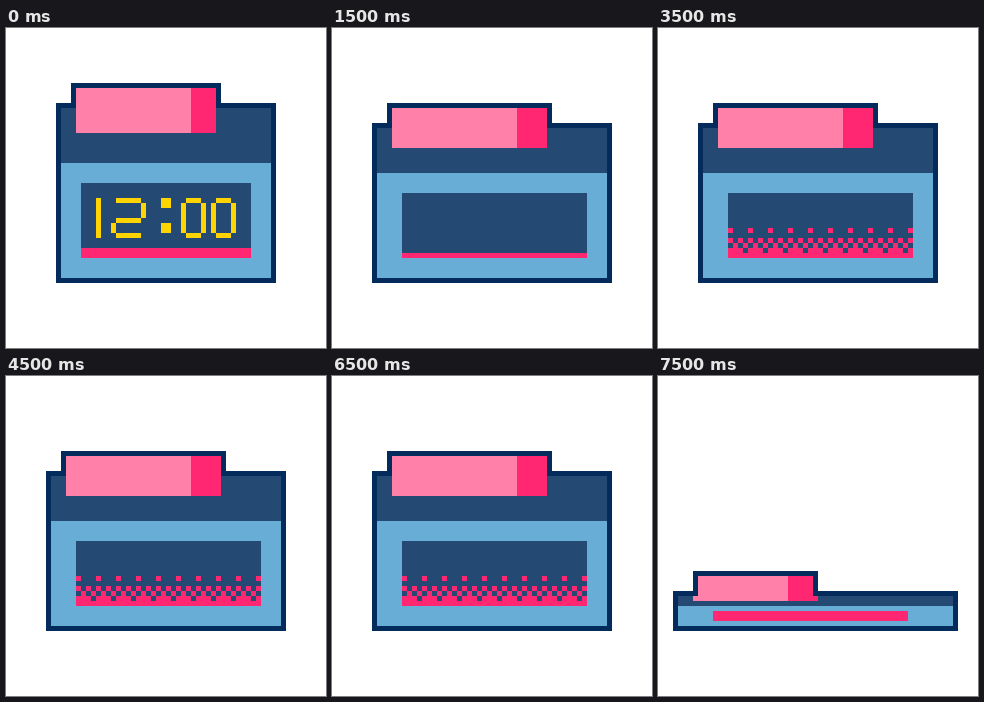
Animation of 320x320 px, one loop 8000 ms. Source, as an HTML page:

```html
<!DOCTYPE html>
<html lang="en">
<head>
<meta charset="utf-8">
<title>Bouncing alarm clock</title>
<style>
  html, body { margin: 0; width: 100%; height: 100%; overflow: hidden; background: #fff; }
  svg { display: block; width: 100%; height: 100%; }
</style>
</head>
<body>
<svg id="stage" viewBox="0 0 320 320" shape-rendering="crispEdges"></svg>
<script>
const LOOP = 8000, BEAT = 500, CELL = 5;
const INK = '#032b5b', NAVY = '#244a74', SKY = '#68add6';
const ROSE = '#ff80a8', PINK = '#ff2672', YELLOW = '#ffd400';
const stage = document.getElementById('stage');

// Boxes are given by their edges: left, top, right, bottom.
const box = (color, l, t, r, b) =>
  `<rect x="${l}" y="${t}" width="${r - l}" height="${b - t}" fill="${color}"/>`;

function clockBody({ body: [l, t, r], lid: [ll, lt, lr, lb], shade, split }) {
  return box(INK, l, t, r, 255) +
    box(INK, ll - 5, lt - 5, lr + 5, t + 5) +
    box(NAVY, l + 5, t + 5, r - 5, split) +
    box(SKY, l + 5, split, r - 5, 250) +
    box(ROSE, ll, lt, shade, lb) +
    box(PINK, shade, lt, lr, lb);
}

// Whether a cell is lit, for each row counted up from the screen's foot.
const ditherRows = [
  () => true,
  i => i % 4 !== 3,
  i => i % 2 === 1,
  i => i % 2 === 0,
  () => false,
  i => i % 4 === 0
];

function dither(left, right, foot) {
  let out = '';
  ditherRows.forEach((lit, row) => {
    const y = foot - (row + 1) * CELL;
    for (let i = 0; left + i * CELL < right; i++) {
      const x = left + i * CELL;
      if (lit(i)) out += box(PINK, x, y, x + CELL, y + CELL);
    }
  });
  return out;
}

const zero = x =>
  box(YELLOW, x + 5, 170, x + 20, 175) +
  box(YELLOW, x, 175, x + 5, 205) +
  box(YELLOW, x + 20, 175, x + 25, 205) +
  box(YELLOW, x + 5, 205, x + 20, 210);

const digits =
  box(YELLOW, 90, 170, 95, 210) +
  box(YELLOW, 110, 170, 135, 175) +
  box(YELLOW, 135, 175, 140, 190) +
  box(YELLOW, 110, 190, 135, 195) +
  box(YELLOW, 105, 195, 110, 205) +
  box(YELLOW, 110, 205, 135, 210) +
  box(YELLOW, 155, 170, 165, 180) +
  box(YELLOW, 155, 195, 165, 205) +
  zero(175) + zero(205);

function tall(glowing) {
  return clockBody({ body: [50, 75, 270], lid: [70, 60, 210, 105], shade: 185, split: 135 }) +
    box(NAVY, 75, 155, 245, 230) +
    (glowing ? dither(75, 245, 225) : '') +
    box(PINK, 75, 220, 245, 230) + digits;
}

function squat(glowing) {
  return clockBody({ body: [40, 95, 280], lid: [60, 80, 215, 120], shade: 185, split: 145 }) +
    box(NAVY, 70, 165, 255, 230) +
    (glowing ? dither(70, 255, 230) : box(PINK, 70, 225, 255, 230));
}

function flat() {
  return clockBody({ body: [15, 215, 300], lid: [40, 200, 155, 225], shade: 130, split: 230 }) +
    box(ROSE, 35, 220, 40, 225) +
    box(PINK, 155, 220, 160, 225) +
    box(PINK, 55, 235, 250, 245);
}

function pose(beat) {
  if (beat === 15) return flat();
  const glowing = beat >= 5;
  return beat % 2 ? squat(glowing) : tall(glowing);
}

let shown = -1;
function draw(time) {
  const beat = Math.floor((time % LOOP) / BEAT);
  if (beat === shown) return;
  shown = beat;
  stage.innerHTML = pose(beat);
}

const start = performance.now();
function tick() {
  draw(performance.now() - start);
  requestAnimationFrame(tick);
}
tick();
</script>
</body>
</html>
```
